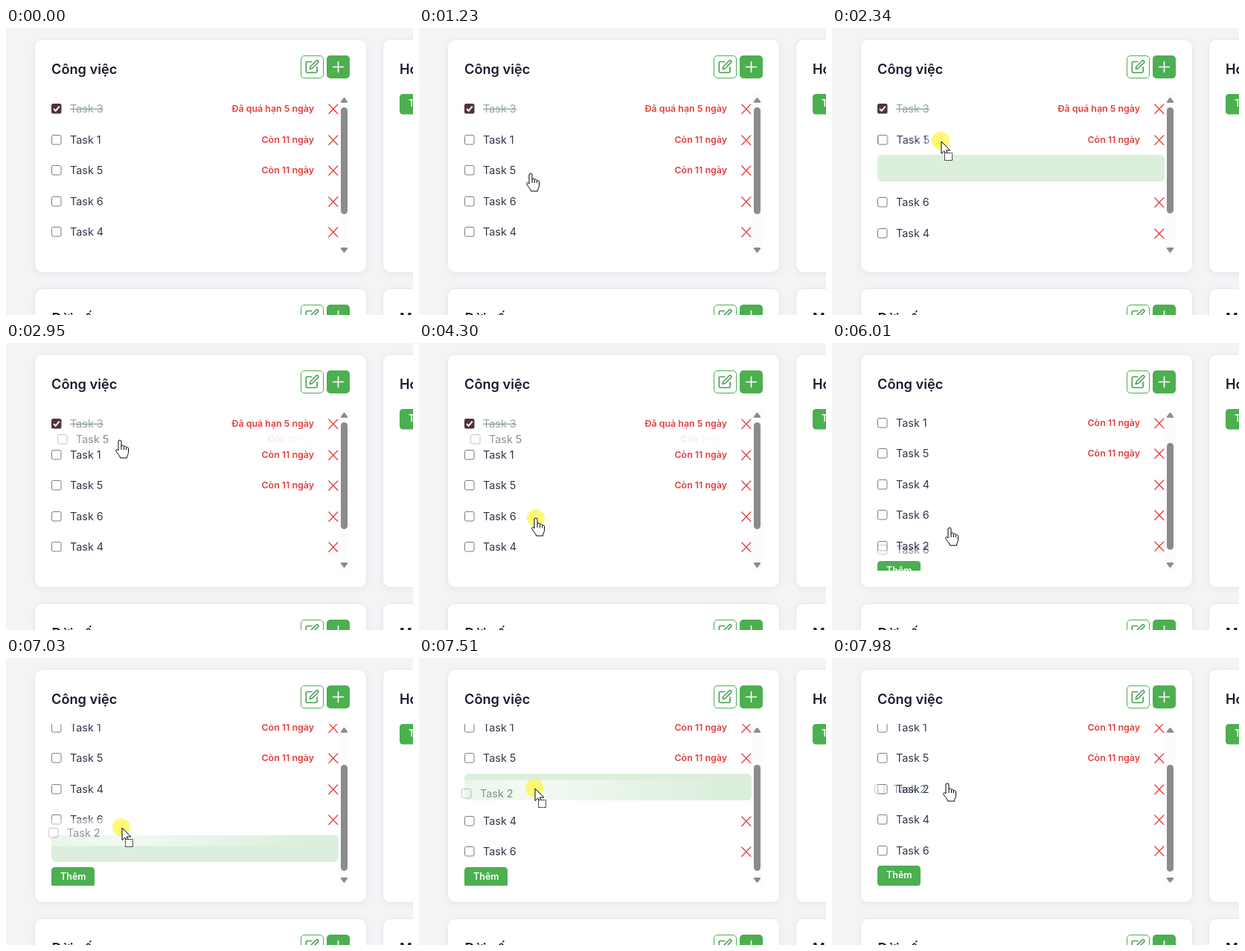
An HTML page for the animation above (8 s loop, 547 by 387 pixels).

```html
<!DOCTYPE html>
<html lang="vi">
<head>
<meta charset="utf-8">
<title>Công việc</title>
<style>
  html, body { margin: 0; width: 100%; height: 100%; overflow: hidden; background: #f3f4f6; }
  svg { display: block; font-family: Inter, sans-serif; }
  .card { fill: #fff; stroke: #e5e7eb; filter: drop-shadow(0 2px 4px rgba(0, 0, 0, .05)); }
  .title { font-size: 18.2px; font-weight: 600; fill: #1a1a2e; }
  .task { font-size: 14.4px; fill: #2d3748; }
  .done { fill: #95a5a6; text-decoration: line-through; }
  .due { font-size: 12.4px; font-weight: 600; fill: #e53e3e; text-anchor: end; }
  .add { font-size: 12.5px; font-weight: 600; fill: #fff; }
  .line { fill: none; stroke-linecap: round; stroke-linejoin: round; }
  .cursor { fill: #fff; stroke: #000; stroke-linejoin: round; }
</style>
</head>
<body>
<svg width="547" height="387" viewBox="0 0 547 387">
  <defs>
    <clipPath id="view"><rect x="55" y="89" width="392" height="218"/></clipPath>
    <radialGradient id="fall">
      <stop offset="0" stop-color="#fff" stop-opacity=".65"/>
      <stop offset="1" stop-color="#fff" stop-opacity="0"/>
    </radialGradient>
    <mask id="fade" maskUnits="userSpaceOnUse" x="0" y="0" width="547" height="387">
      <circle id="halo" r="260" fill="url(#fall)"/>
    </mask>
    <g id="tools">
      <rect x="396.5" y="37.5" width="30" height="30" rx="4.5" fill="#fff" stroke="#4caf50"/>
      <g class="line" transform="translate(401.7 42.2) scale(.82)" stroke="#4a9e55" stroke-width="2">
        <path d="M11 4H4a2 2 0 0 0-2 2v14a2 2 0 0 0 2 2h14a2 2 0 0 0 2-2v-7"/>
        <path d="M18.5 2.5a2.1 2.1 0 0 1 3 3L12 15l-4 1 1-4z"/>
      </g>
      <rect x="431" y="37" width="31" height="31" rx="5" fill="#4caf50"/>
      <path class="line" d="M439.5 52.5h14M446.5 45.5v14" stroke="#fff" stroke-width="1.6"/>
    </g>
    <g id="add">
      <rect width="58" height="27.5" rx="4.5" fill="#4caf50"/>
      <text class="add" x="12" y="17">Thêm</text>
    </g>
  </defs>

  <rect width="547" height="387" fill="#f3f4f6"/>
  <g id="cards"></g>
  <rect x="447" y="89" width="15" height="218" fill="#fcfcfc"/>
  <g fill="#8b8b8b">
    <path id="up" d="M454.5 94.8l3.6 4.9h-7.2z" stroke="#8b8b8b" stroke-width="2" stroke-linejoin="round"/>
    <use href="#up" transform="matrix(1 0 0 -1 0 396.8)"/>
    <rect id="thumb" x="450" width="9" rx="4.5"/>
  </g>
  <g clip-path="url(#view)">
    <rect id="gap" x="61" width="386" height="36" rx="6" fill="#dbefdc"/>
    <g id="list"></g>
    <use id="more" href="#add"/>
  </g>

  <g id="ghost" mask="url(#fade)">
    <g id="ghostPos">
      <rect x="61" y="2.5" width="386" height="36" fill="#fff"/>
      <use id="ghostRow"/>
    </g>
  </g>
  <g id="pointer">
    <circle id="press" r="12" fill="#fff53d" fill-opacity=".7"/>
    <g id="hand" class="cursor">
      <path d="M-2 14V2a2 2 0 0 1 4 0v6.5c0-2 3.5-2 3.5 0v1c0-1.8 3-1.8 3 .2v1c0-1.6 3-1.4 3 .6v5.2c0 3-2 4-2 7.5H.5c0-3-3.5-5-5.5-9c-1-2.2 1-3.2 2.2-1.8z"/>
      <path d="M2 8.5v4.5M5.5 9.5v3.5M8.5 10.5v2.5" fill="none"/>
    </g>
    <g id="arrow" class="cursor" transform="translate(1 1)">
      <path d="M0 0v16.5l3.8-3.6 2.5 6 2.6-1.1-2.5-5.8h5.3z"/>
      <rect id="box" x="4.5" y="15.5" width="10" height="10" stroke-dasharray="2 1"/>
    </g>
  </g>
</svg>
<script>
const $ = id => document.getElementById(id);
const LOOP = 8000, STEP = 70, TOP = 88, PITCH = 41.5, GAP_EXTRA = 1.7, SCROLL = 57;
const TASKS = [3, 1, 5, 6, 4, 2];
const DUE = { 3: 'Đã quá hạn 5 ngày', 1: 'Còn 11 ngày', 5: 'Còn 11 ngày' };

// Pointer moves: start, end, x, y
const HOME = [581, 400];
const MOVES = [
  [260, 330, 417, 350], [600, 1370, 145, 193],
  [1710, 2340, 146, 152], [2400, 2470, 148, 133],
  [2540, 2540, 149, 127], [2610, 2680, 153, 131],
  [3280, 3880, 157, 236], [4370, 5060, 157, 281],
  [5530, 5740, 157, 246], [5940, 6150, 158, 251], [6350, 6420, 159, 252],
  [6690, 7030, 155, 228], [7100, 7370, 155, 182],
  [7440, 7440, 155, 175], [7510, 7710, 155, 169]
];

// Each slots entry: time, place of the dragged task in the list
const DRAGS = [
  { task: 5, press: 1570, drop: 2950, slots: [[1710, 2], [2400, 1], [2950, 2]] },
  { task: 6, press: 4300, drop: 5460, slots: [[4370, 3], [4860, 4]] },
  { task: 2, press: 6620, drop: 7980, slots: [[6690, 5], [7170, 4], [7440, 3]] }
];

function card(x, y, title) {
  return `<rect class="card" x="${x + .5}" y="${y + .5}" width="446" height="314" rx="10"/>
    <text class="title" x="${x + 23}" y="${y + 47}">${title}</text>`;
}

function row(id) {
  const check = id === 3
    ? `<rect x="61" y="14" width="13.5" height="13.5" rx="2.5" fill="#4f3340"/>
       <path d="M64 21l2.7 2.7 5-6" fill="none" stroke="#fff" stroke-width="2"/>`
    : '<rect x="61.5" y="14.5" width="12.5" height="12.5" rx="2" fill="#fff" stroke="#767f80"/>';
  return `<g id="row${id}">${check}
    <text class="task ${id === 3 ? 'done' : ''}" x="86" y="26">Task ${id}</text>
    <text class="due" x="414" y="25">${DUE[id] || ''}</text>
    <path class="line" d="M433.8 15l12 12.5m0-12.5l-12 12.5" stroke="#e5383b" stroke-width="1.2"/></g>`;
}

$('cards').innerHTML =
  card(38, 15, 'Công việc') + card(506, 15, 'Học tập') +
  card(38, 351, 'Đời sống') + card(506, 351, 'Mua sắm') +
  '<use href="#tools"/><use href="#tools" y="336"/><use href="#add" x="529" y="89"/>';
$('list').innerHTML = TASKS.map(id => `<g id="place${id}">${row(id)}</g>`).join('');

const ease = p => p < .5 ? 4 * p ** 3 : 1 - 4 * (1 - p) ** 3;
const progress = (t, a, b) => t < a ? 0 :
  Math.min(1, (Math.floor((t - a) / STEP) + 1) * STEP / (b - a + STEP));
const show = (id, on) => $(id).setAttribute('visibility', on ? 'visible' : 'hidden');
const move = (id, x, y) => $(id).setAttribute('transform', `translate(${x} ${y})`);
const attrs = (id, values) => {
  for (const key in values) $(id).setAttribute(key, values[key]);
};

function pointerAt(t) {
  let [x, y] = HOME;
  for (const [a, b, nx, ny] of MOVES) {
    const p = ease(progress(t, a, b));
    x += (nx - x) * p;
    y += (ny - y) * p;
  }
  return [Math.round(x), Math.round(y)];
}

function listAt(t) {
  let order = TASKS, drag = null;
  for (const d of DRAGS) {
    const past = d.slots.filter(s => s[0] <= t);
    if (!past.length) continue;
    const from = order.indexOf(d.task), slot = past.at(-1)[1];
    order = order.filter(id => id !== d.task);
    order.splice(slot, 0, d.task);
    drag = t < d.drop ? { ...d, from, slot } : null;
  }
  return { order, drag };
}

function draw(t) {
  const [x, y] = pointerAt(t);
  const { order, drag } = listAt(t);
  const scroll = SCROLL * (1 - (1 - progress(t, 5940, 6150)) ** 2);
  const slotY = i => TOP + PITCH * i - scroll;

  order.forEach((id, i) => {
    move('place' + id, 0, Math.round(slotY(i) + (drag && i > drag.slot ? GAP_EXTRA : 0)));
    show('place' + id, !drag || id !== drag.task);
  });
  move('more', 61, Math.round(slotY(order.length) + (drag ? GAP_EXTRA : 0)));
  attrs('thumb', { y: 107 + 37 * scroll / SCROLL, height: drag ? 143 : 144 });

  show('gap', drag);
  show('ghost', drag);
  if (drag) {
    const [gx, gy] = pointerAt(drag.press);
    attrs('gap', { y: Math.round(slotY(drag.slot)) });
    attrs('halo', { cx: x, cy: y });
    attrs('ghostRow', { href: '#row' + drag.task });
    // The task row itself is hidden, so its copy has to be shown explicitly
    $('ghostRow').setAttribute('visibility', 'visible');
    move('ghostPos', x - gx, Math.round(slotY(drag.from)) + y - gy);
  }

  const arrow = drag || y > 305;
  move('pointer', x, y);
  show('press', DRAGS.some(d => t >= d.press && t < d.drop));
  show('hand', !arrow);
  show('arrow', arrow);
  show('box', drag);
}

const start = performance.now();
function tick() {
  draw((performance.now() - start) % LOOP);
  requestAnimationFrame(tick);
}
tick();
</script>
</body>
</html>
```
